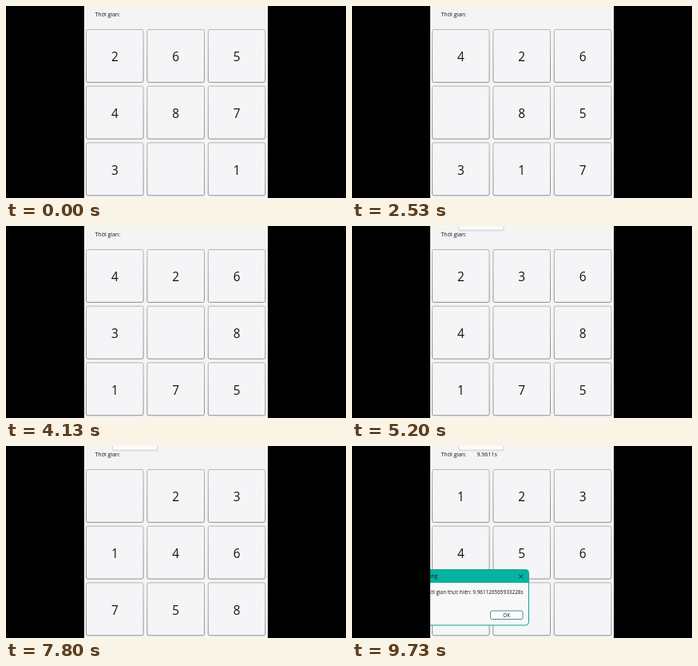
An HTML page that plays this animation: 426x240 px, repeating every 9.79 s.

```html
<!DOCTYPE html>
<html lang="vi">
<head>
<meta charset="utf-8">
<title>8-puzzle</title>
<style>
  html, body { margin: 0; width: 100%; height: 100%; overflow: hidden; background: #000; }
  svg { display: block; width: 100%; height: 100%; }
  text { font-family: "Open Sans", "Noto Sans", sans-serif; fill: #141414; }
  .label { font-size: 7px; }
  .digit { font-size: 15.4px; text-anchor: middle; }
  .small { font-size: 6.4px; }
  .end { text-anchor: end; }
  .hidden { display: none; }
</style>
</head>
<body>
<svg viewBox="0 0 426 240">
  <defs>
    <clipPath id="window"><rect x="98" y="0" width="230" height="240"/></clipPath>
    <linearGradient id="edge" x1="0" y1="0" x2="0" y2="1">
      <stop offset="0" stop-color="#b4b4b6"/>
      <stop offset="1" stop-color="#8e8e90"/>
    </linearGradient>
  </defs>
  <rect width="426" height="240"/>
  <g clip-path="url(#window)">
    <rect x="98" width="230" height="240" fill="#f4f4f5"/>
    <text class="label" x="111.5" y="12.6">Thời gian:</text>
    <text class="label hidden" id="elapsed" x="156.5" y="12.6">9.9611s</text>
    <g id="popup" class="hidden">
      <rect x="133" y="-6" width="58" height="12.5" rx="2" fill="#e2e2e6"/>
      <rect x="133.5" y="-6" width="56.5" height="11" rx="2" fill="#fbfbfc" stroke="#d0d2da" stroke-width=".8"/>
    </g>
    <g id="board"></g>
    <g id="dialog" class="hidden">
      <path d="M80 154.5H217.5a4 4 0 0 1 4 4V220a4 4 0 0 1-4 4H80Z" fill="#f8f8f9"/>
      <path d="M80 154.5H217.5a4 4 0 0 1 4 4V171H80Z" fill="#06b2a0"/>
      <path d="M80 154.5H217.5a4 4 0 0 1 4 4V220a4 4 0 0 1-4 4H80" fill="none" stroke="#18a396"/>
      <text class="small end" x="107" y="165.3">Thành công</text>
      <path d="M209 160.5l5 5m0-5l-5 5" stroke="#102020" stroke-width=".9"/>
      <text class="small end" x="214.5" y="185.2">Thời gian thực hiện: 9.961126565933228s</text>
      <rect x="173.5" y="206" width="40.5" height="10.5" rx="2" fill="#fcfcfd" stroke="#4f8f8a"/>
      <text class="small" x="193.8" y="213.6" text-anchor="middle">OK</text>
    </g>
  </g>
</svg>
<script>
const LOOP = 9790, START = 325, STEP = 320;
const POPUP_AT = 5200, DONE_AT = 9285;
const MOVES = "RUULLDDRRULLURDLDRRUULLDRDR"; // directions of the empty cell
const SHIFT = { U: -3, D: 3, L: -1, R: 1 };
const TILE = { width: 71.6, height: 65.9 };
const $ = id => document.getElementById(id);

function make(tag, attrs) {
  const el = document.createElementNS("http://www.w3.org/2000/svg", tag);
  for (const key in attrs) el.setAttribute(key, attrs[key]);
  return $("board").appendChild(el);
}

const digits = Array.from({ length: 9 }, (_, i) => {
  const x = 100.5 + (i % 3) * 76.4, y = 29.5 + Math.floor(i / 3) * 70.7;
  make("rect", { x, y, ...TILE, rx: 2, fill: "#f5f5f7", stroke: "url(#edge)" });
  return make("text", { class: "digit", x: x + TILE.width / 2, y: y + 39.6 });
});

const states = [[2, 6, 5, 4, 8, 7, 3, 0, 1]];
for (const move of MOVES) {
  const next = states[states.length - 1].slice();
  const from = next.indexOf(0), to = from + SHIFT[move];
  [next[from], next[to]] = [next[to], 0];
  states.push(next);
}

let shown = -1;
function draw(t) {
  const n = Math.max(0, Math.min(MOVES.length, Math.floor((t - START) / STEP)));
  if (n !== shown) {
    states[n].forEach((v, i) => { digits[i].textContent = v || ""; });
    shown = n;
  }
  $("popup").classList.toggle("hidden", t < POPUP_AT);
  for (const id of ["elapsed", "dialog"]) $(id).classList.toggle("hidden", t < DONE_AT);
}

const origin = performance.now();
function tick() {
  draw((performance.now() - origin) % LOOP);
  requestAnimationFrame(tick);
}
tick();
</script>
</body>
</html>
```
